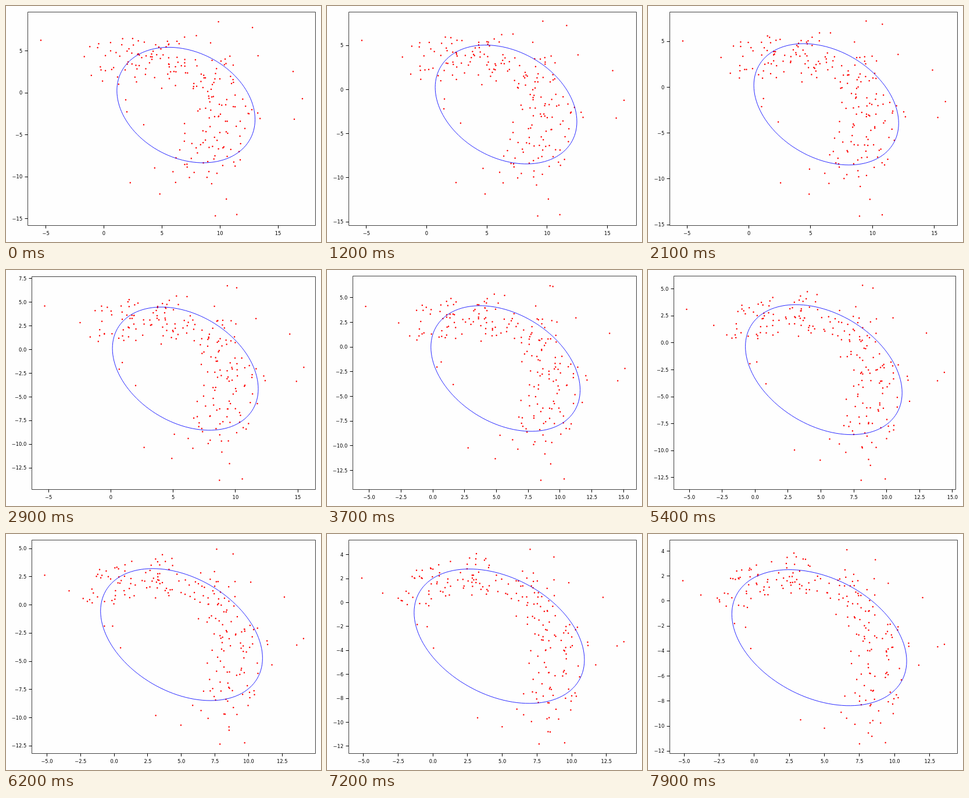
An HTML page for the animation above (8 s loop, 542x408 px).

```html
<!DOCTYPE html>
<html lang="en">
<head>
<meta charset="utf-8">
<title>Scatter flow</title>
<style>
  html, body { margin: 0; width: 100%; height: 100%; overflow: hidden; background: #fefefe; }
  svg { display: block; }
  text { font: 8.33px "DejaVu Sans", sans-serif; fill: #000; }
  path { fill: none; stroke: #000; }
  #cloud { stroke: #f00; stroke-width: 2.5; stroke-linecap: round; }
  #ring { stroke: #00f; stroke-width: 0.85; }
  #frame { stroke-width: 0.75; }
</style>
</head>
<body>
<svg width="542" height="408" viewBox="0 0 542 408">
  <path id="cloud"/>
  <path id="ring"/>
  <path id="frame"/>
  <path id="marks"/>
  <g id="labels"></g>
</svg>
<script>
const LOOP = 8000, STEP = 100, LAST = LOOP - STEP, COUNT = 200;
const $ = id => document.getElementById(id);

// bend > 0 slows down towards the end, bend < 0 speeds up
const glide = (a, b, u, bend) => a + (b - a) * u * (1 + bend * (1 - u));

// start, end and bend of the data bounds and the ellipse
const bounds = {
  xMin: [-5.43, -5.09, 0], xMax: [17.1, 13.55, 0.5],
  yMin: [-14.65, -11.42, -0.38], yMax: [8.47, 4.1, 0.2]
};
const oval = {
  cx: [7.07, 4.63, 0.35], cy: [-1.45, -2.93, 0.08],
  w: [5.95, 6.23, -3.1], h: [6.88, 5.44, -0.43], tilt: [0.25, 0.345, 2]
};
const at = (set, u) => Object.fromEntries(
  Object.entries(set).map(([name, [a, b, bend]]) => [name, glide(a, b, u, bend)]));

// a few outlying points: start x, y and end x, y
const points = [
  [-5.43, 6.27, -5.09, 1.63], [17.1, -0.7, 13.55, -3.46],
  [9.6, -14.65, 7.5, -11.42], [9.87, 8.47, 8.63, 3.3],
  [12.8, 7.78, 6.6, 4.1], [11.45, -14.5, 9.35, -11.33],
  [10.55, -12.65, 8.13, -10.55], [2.27, -10.7, 3.3, -9.5],
  [4.82, -12.05, 5, -10.17], [16.3, 2.55, 12, 0.27],
  [16.4, -3.15, 13.07, -3.66], [1.98, -2.27, -1.41, -1.8],
  [3.43, -3.8, -0.25, -3.8], [1.88, -0.83, -0.62, -2.1]
];

let seed = 20;
const rand = () => (seed = (seed * 16807) % 2147483647) / 2147483647;
const bell = () => 2 * (rand() + rand() + rand() - 1.5);
const bezier = (a, b, c, d, s) => {
  const r = 1 - s;
  return r * r * r * a + 3 * r * r * s * b + 3 * r * s * s * c + s * s * s * d;
};

// the rest ends up scattered around an arc and starts more spread out
for (let i = 0; i < COUNT; i++) {
  const s = rand() ** 0.8;
  const x = bezier(-3, 1.5, 14.5, 7.2, s), y = bezier(-0.3, 5.5, 0, -10, s);
  const ox = (0.7 + 0.6 * s) * bell(), oy = 0.8 * bell();
  points.push([
    x + 1.8 + 3.2 * s - 5 * s * s + 1.4 * ox + 0.9 * bell(),
    y + 3.3 - 3.8 * s + 1.3 * oy + 0.9 * bell(),
    x + ox, y + oy
  ]);
}

const pad = (lo, hi) => [lo - (hi - lo) * 0.05, hi + (hi - lo) * 0.05];
const tickStep = ([lo, hi]) => [2, 2.5, 5].find(s => s * 9 >= hi - lo) || 5;

function ticks([lo, hi], step) {
  const list = [];
  for (let v = Math.ceil(lo / step) * step; v <= hi; v += step) list.push(v);
  return list;
}

const format = (v, step) =>
  (v < 0 ? "\u2212" : "") + Math.abs(v).toFixed(step === 2.5 ? 1 : 0);
const label = (x, y, anchor, s) =>
  `<text x="${x.toFixed(1)}" y="${y.toFixed(1)}" text-anchor="${anchor}">${s}</text>`;
const snap = v => Math.floor(v) + 0.5;

function draw(t) {
  const u = t / LAST;
  const { xMin, xMax, yMin, yMax } = at(bounds, u);
  const { cx, cy, w, h, tilt } = at(oval, u);
  const xr = pad(xMin, xMax), yr = pad(yMin, yMax);
  const xs = tickStep(xr), ys = tickStep(yr);
  const xt = ticks(xr, xs), yt = ticks(yr, ys);

  // the plot shrinks when an edge label would stick out
  const left = ys === 2.5 ? 44.5 : 37.5, bottom = 379.5;
  const gapX = (xr[1] - xt[xt.length - 1]) / (xr[1] - xr[0]) * (532.5 - left);
  const gapY = (yr[1] - yt[yt.length - 1]) / (yr[1] - yr[0]) * 369;
  const right = 532.5 - Math.max(0, (xs === 2.5 ? 8.6 : 5) - gapX);
  const top = 10.5 + Math.max(0, 4 - gapY);
  const px = x => left + (x - xr[0]) / (xr[1] - xr[0]) * (right - left);
  const py = y => bottom - (y - yr[0]) / (yr[1] - yr[0]) * (bottom - top);

  $("cloud").setAttribute("d", points.map(([ax, ay, bx, by]) => {
    const x = glide(ax, bx, u, 0.04 + 0.02 * ax);
    const y = glide(ay, by, u, 0.3 - 0.05 * Math.abs(ay));
    return `M${px(x).toFixed(2)} ${py(y).toFixed(2)}h0`;
  }).join(""));

  const phase = Math.asin(tilt), ring = [];
  for (let i = 0; i < 120; i++) {
    const a = i * Math.PI / 60;
    ring.push(px(cx + w * Math.cos(a)).toFixed(2) + " " + py(cy - h * Math.sin(a + phase)).toFixed(2));
  }
  $("ring").setAttribute("d", "M" + ring.join("L") + "Z");
  $("frame").setAttribute("d", `M${left} ${snap(top)}H${snap(right)}V${bottom}H${left}Z`);

  let marks = "", text = "";
  for (const v of xt) {
    marks += `M${snap(px(v))} ${bottom}v5`;
    text += label(px(v), 396, "middle", format(v, xs));
  }
  for (const v of yt) {
    marks += `M${left} ${snap(py(v))}h-5`;
    text += label(left - 9.3, py(v) + 3.1, "end", format(v, ys));
  }
  $("marks").setAttribute("d", marks);
  $("labels").innerHTML = text;
}

let shown = -1;
const begin = performance.now();
function tick() {
  const t = Math.floor((performance.now() - begin) % LOOP / STEP) * STEP;
  if (t !== shown) draw(shown = t);
  requestAnimationFrame(tick);
}
tick();
</script>
</body>
</html>
```
